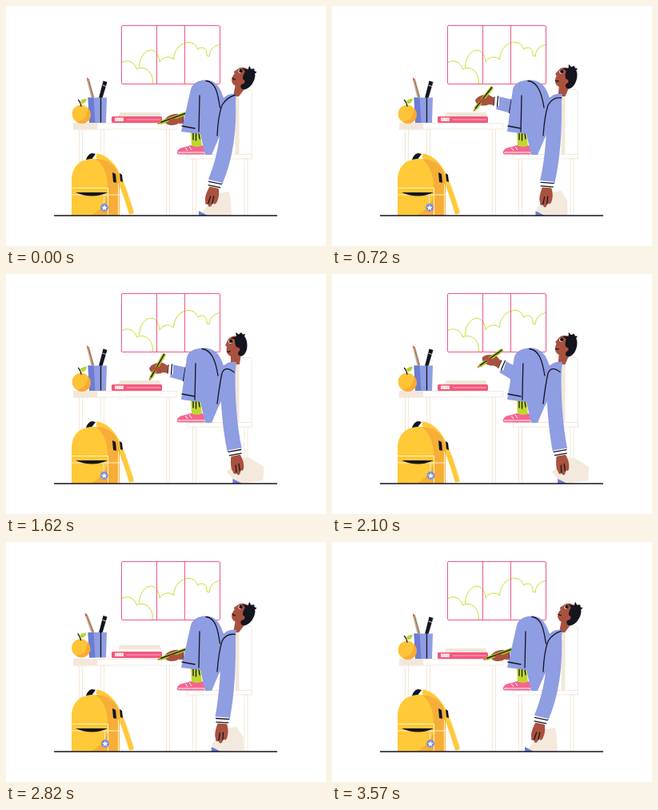
Animation of 400 by 300 pixels, one loop 3600 ms. Source, as an HTML page:

```html
<!DOCTYPE html>
<html lang="en">
<head>
<meta charset="utf-8">
<title>Daydreaming at the desk</title>
<style>
html, body { margin: 0; width: 100%; height: 100%; overflow: hidden; background: #fff; }
svg { display: block; width: 100vw; height: 100vh; }
.ink { fill: none; stroke: #15151f; stroke-width: 1.3; stroke-linecap: round; stroke-linejoin: round; }
.blue { fill: #8f9de2; }
.skin { fill: #a9513f; }
.wood { fill: #fff; stroke: #f3e7da; stroke-width: 1; }
.seam { fill: none; stroke: #fff1cc; stroke-width: 1; }
</style>
</head>
<body>
<svg viewBox="0 0 400 300">
  <g fill="none" stroke="#f0578a">
    <path stroke="#c9dc34" d="M144.500 71C152 66 161 70 163.500 79C174 74 184 82 183.500 97
      M166.500 77C167 61 176 54 183 55.500C189 57 191 63 192 70C196 63 205 62 209.500 67
      C210 53 220 45 229 45.500C235 46 238 49 239.500 54C246 49 252 54 251 62L254 63C255 54 260 50 268 48"/>
    <rect x="144.500" y="24.500" width="123" height="73" rx="1.500"/>
    <path d="M188.500 24.500v73M223.500 24.500v73"/>
  </g>

  <g class="wood">
    <path d="M288.500 187V104.500H304Q307 104.500 307 108V187Z"/>
    <path fill="#f3e7da" d="M287 110h4v76h-4z"/>
    <path d="M233.500 191h4v71h-4zM298 191h4v71h-4z"/>
    <rect x="226.500" y="185.500" width="81" height="5.500"/>
    <path d="M91.500 154h4v108h-4zM118.500 154h4v108h-4zM200.500 154h4v108h-4z"/>
    <rect x="84.500" y="146.500" width="129" height="7.500"/>
    <path fill="#f3e7da" d="M84.500 146.500h29v7.500h-29z"/>
  </g>

  <g id="sheet"><path fill="#f1e6d8" d="M143 133h49l2 5h-54z"/></g>
  <g id="book">
    <rect x="132" y="138" width="63" height="8" rx="1.500" fill="#f4577f"/>
    <path fill="#fbe3dc" d="M136 139.500h11v4.500h-11z"/>
    <path stroke="#fbb3c0" d="M151 142h42"/>
  </g>
  <g id="cup">
    <g id="pencil">
      <path fill="#c9a98c" d="M101.500 94l3-1.500 6 22h-4z"/>
      <path fill="#d9533f" d="M101 89l3.500 3.500-3 1.500z"/>
      <path stroke="#6b5547" stroke-width=".7" d="M103.500 94l5.500 20"/>
    </g>
    <path fill="#15151f" d="M121.500 93.500l5 1.500-6 20h-4.500z"/>
    <path stroke="#fff" stroke-width=".8" d="M120.500 99l4.500 1.500"/>
    <path class="blue" d="M102.500 114.500h23.500l-1 31.500h-21z"/>
    <path fill="#6b7cd2" d="M102.500 114.500h7l2 31.500h-7.500z"/>
    <path class="ink" stroke-width="1" d="M118.500 115v30"/>
  </g>
  <g id="fruit">
    <circle cx="93.800" cy="135" r="11.200" fill="#ffc337"/>
    <path fill="#f9aa35" d="M102 127.500A11 11 0 0 1 88 144.500C97 144 103 138 102 127.500Z"/>
    <path class="ink" d="M94 125Q93 120 90.500 117.500"/>
    <path fill="#b9d433" d="M93 122Q93 115 101 116Q100 123 93 122Z"/>
  </g>

  <path fill="none" stroke="#fbe0a0" stroke-width="7" d="M114 188C134 192 143 213 157 259"/>
  <path fill="none" stroke="#ffc937" stroke-width="5.500" d="M113 187C134 191 143 213 157 260"/>
  <path fill="#15151f" d="M100 192Q103 184 108 184L112 185L106 193Z"/>
  <path fill="#ffc937" d="M82 262V218C82 200 93 191 109 191C130 191 142 202 142 222V262Z"/>
  <path fill="#f6ae38" d="M112 191C131 192 142 202 142 222V262H127V226C127 211 122 198 112 191ZM127 238V262H105Q121 255 127 238Z"/>
  <path class="seam" d="M82 227.500H127M82 236H142M127.500 227V262M140.500 222V262"/>
  <path fill="#15151f" d="M87 233H127Q108 242 87 233ZM133 208l4 2 1 11-4-1zM142 209l3 2 1 9-3-1z"/>
  <g id="charm">
    <path stroke="#dfe3fa" d="M122.500 236v11"/>
    <circle cx="123" cy="252" r="5" fill="#7f8fda"/>
    <path fill="#fff" d="M123 248.500l1 2.400 2.600.2-2 1.700.7 2.500-2.300-1.400-2.300 1.400.7-2.500-2-1.700 2.600-.2z"/>
  </g>

  <g id="sleeve">
    <path class="blue" d="M2-6L38-2V16L0 10Z"/>
    <path class="ink" d="M18-4L17 13"/>
  </g>
  <g id="writer">
    <path fill="#fff" d="M-4-5h7v11h-7z"/>
    <path class="ink" d="M-3-5L-4 5M1.500-6L.5 6"/>
    <path class="skin" d="M-3-4L-10-8C-17-9-25-6-27-1C-26 6-15 7-10 4L-4 5Z"/>
  </g>
  <g id="pen">
    <path fill="#a9bf22" d="M-15-2.200H18.500V2.200H-15L-20 0Z"/>
    <path class="ink" stroke-width=".9" d="M-15-.3H18"/>
    <path fill="#d9533f" d="M-20 0l3-1.200v2.400z"/>
  </g>
  <path id="grip" class="skin" d="M-22-1Q-18-5-12-2L-14 1L-20 3Z"/>

  <path fill="#bfd72e" d="M231 157H243L245 176H232Z"/>
  <path class="ink" stroke-width="1" d="M234 159v8M237.500 159v9M241 159l1 7"/>
  <path fill="#f4668f" d="M214 182C216 176 224 177 231 174Q239 178 246 174Q249 180 248 185.500H216Q213 185 214 182Z"/>
  <path fill="none" stroke="#fff" d="M215 183H248M224 177l3 4M229 176l3 4"/>

  <path id="neck" class="skin"/>
  <path id="body" class="blue"/>
  <path id="folds" class="ink"/>
  <g id="head">
    <path class="skin" d="M277 83L274 89L276 91C275 96 276 101 281 103C288 105 295 98 297 90L293 79C287 76 279 78 277 83Z"/>
    <path fill="#15151f" d="M281 80L288 78L287 73L291 75.500L294 73L296 75.500L299 75L298 78C302 82 302.500 92 300 97C297 104 292 104 290 100L291 93C287 92 286 87 286 82Z"/>
    <circle class="skin" cx="289.500" cy="94.500" r="2.800"/>
    <circle cx="280.500" cy="84.500" r="2.400" fill="#fff"/>
    <circle cx="281" cy="84" r="2.200" fill="#15151f"/>
    <path class="ink" stroke-width="1" d="M276.500 97Q278.500 98 280 96.500"/>
    <path fill="none" stroke="#d9533f" stroke-width=".8" d="M289 93.500l1.500 2"/>
  </g>

  <path id="paper" fill="#f3e9dc"/>
  <path id="flap" fill="#6b7cd2"/>
  <path id="arm" fill="none" stroke="#8f9de2" stroke-width="18.500"/>
  <path id="shoulder" class="ink"/>
  <g id="hand">
    <path class="skin" d="M-5 5L5 5C8 12 9 18 7 25Q5 29 3 26L1 31Q-2 33-3 29Q-7 31-7 26C-9 22-8 14-5 5Z"/>
    <path class="ink" stroke-width=".8" d="M-3 28L-2 19M2 27L2 18"/>
    <path fill="#fff" d="M-8-1H8L7 7H-7Z"/>
    <path class="ink" d="M-8 1H8M-7.500 5.500H7.500"/>
  </g>
  <path class="ink" d="M60.500 262H338.500"/>
</svg>
<script>
const LOOP = 3600, SLAP = 2600;
const el = id => document.getElementById(id);
const mix = (a, b, k) => a + (b - a) * k;
const ease = (t, from, to) => {
  const u = Math.min(1, Math.max(0, (t - from) / (to - from)));
  return u * u * (3 - 2 * u);
};
const place = (id, x, y, angle = 0) =>
  el(id).setAttribute('transform', `translate(${x} ${y}) rotate(${angle})`);
const draw = (id, d) => el(id).setAttribute('d', d);
const blend = (a, b, k) => 'M' + a.map((v, i) => mix(v, b[i], k)).join(' ') + 'Z';
const arc = (t, from, length) => {
  const u = (t - from) / length;
  return u > 0 && u < 1 ? 4 * u * (1 - u) : 0;
};

function writingArm(t) {
  const up = ease(t, 150, 700) - ease(t, 1750, 2600);
  const lift = Math.sin(Math.PI * up);
  const x = mix(225, 206, up), y = mix(142, 119, up) - 15 * lift;
  const turn = mix(-5, 0, up) + 22 * lift;
  const a = turn * Math.PI / 180, c = Math.cos(a), s = Math.sin(a);
  const scribble = 6 * up * Math.cos(2 * Math.PI * (t - 720) / 192);
  place('sleeve', x, y, mix(-50, 6, up) + 40 * lift);
  place('writer', x, y, turn);
  place('grip', x, y, turn);
  place('pen', x - 17 * c + 3 * s, y - 17 * s - 3 * c, mix(-20, -58, up) + 8 * lift + scribble);
  return 5 * (1 - up);
}

function hangingArm(t) {
  const w = 2 * Math.PI * t / LOOP;
  const swing = .5 - .5 * Math.cos(w - .12 * Math.sin(2 * w));
  const x = mix(261.5, 286, swing), bend = mix(281, 276, swing);
  draw('arm', `M277.5 114Q${bend} 174 ${x} 220`);
  place('hand', x, 220, mix(12, -11, swing));
  draw('paper', blend(
    [264, 234, 279, 232, 281, 245, 282, 262, 246, 262, 246, 257],
    [293, 231, 303, 229, 323, 241, 322, 258, 290, 262, 276, 247], swing));
  draw('flap', blend([241, 256, 252, 262, 241, 262], [284, 256, 296, 262, 284, 262], swing));
  draw('shoulder', `M264 162Q${mix(265, 267, swing)} 138 270 124Q${mix(276, 274, swing)} 114 ${mix(287, 285, swing)} ${mix(111, 123, swing)}`);
  place('charm', -1 * Math.sin(w), 0);
}

function figure(t, k) {
  const forward = ease(t, 300, 1150) - ease(t, 1680, 2520);
  el('head').setAttribute('transform',
    `translate(${mix(1.5, 0, forward)} ${mix(-2, 0, forward)}) rotate(${mix(30, 0, forward)} 288 104)`);
  draw('neck', blend([287, 97, 301, 100, 291, 113, 284, 113], [281, 99, 294, 98, 292, 113, 281, 113], forward));
  draw('body', `M219 157L${226 + k} 104C${228 + k} 96 ${236 + k} 93 ${246 + k / 2} 92.500
    C262 92 268 102 272 115Q277 109 288 110L286 128L266 165L257 186H249L243 160Z`);
  draw('folds', `M${245 + k} 93.500C${257 + k} 95 ${262 + k / 2} 108 ${265 + k / 2} 127
    M${237 + k} 112L${236 + k} 157M220 150L236 153`);
}

function bounce(t) {
  const hop = arc(t, SLAP, 440) + .3 * arc(t, SLAP + 440, 240);
  place('sheet', 0, -4 * hop);
  place('book', 0, -hop);
  place('cup', 0, -1.5 * hop);
  el('pencil').setAttribute('transform', `rotate(${-6 * hop} 109 114)`);
  place('fruit', -.5 * hop, -2.5 * hop);
}

function frame(now) {
  const t = now % LOOP;
  figure(t, writingArm(t));
  hangingArm(t);
  bounce(t);
  requestAnimationFrame(frame);
}
frame(performance.now());
</script>
</body>
</html>
```
